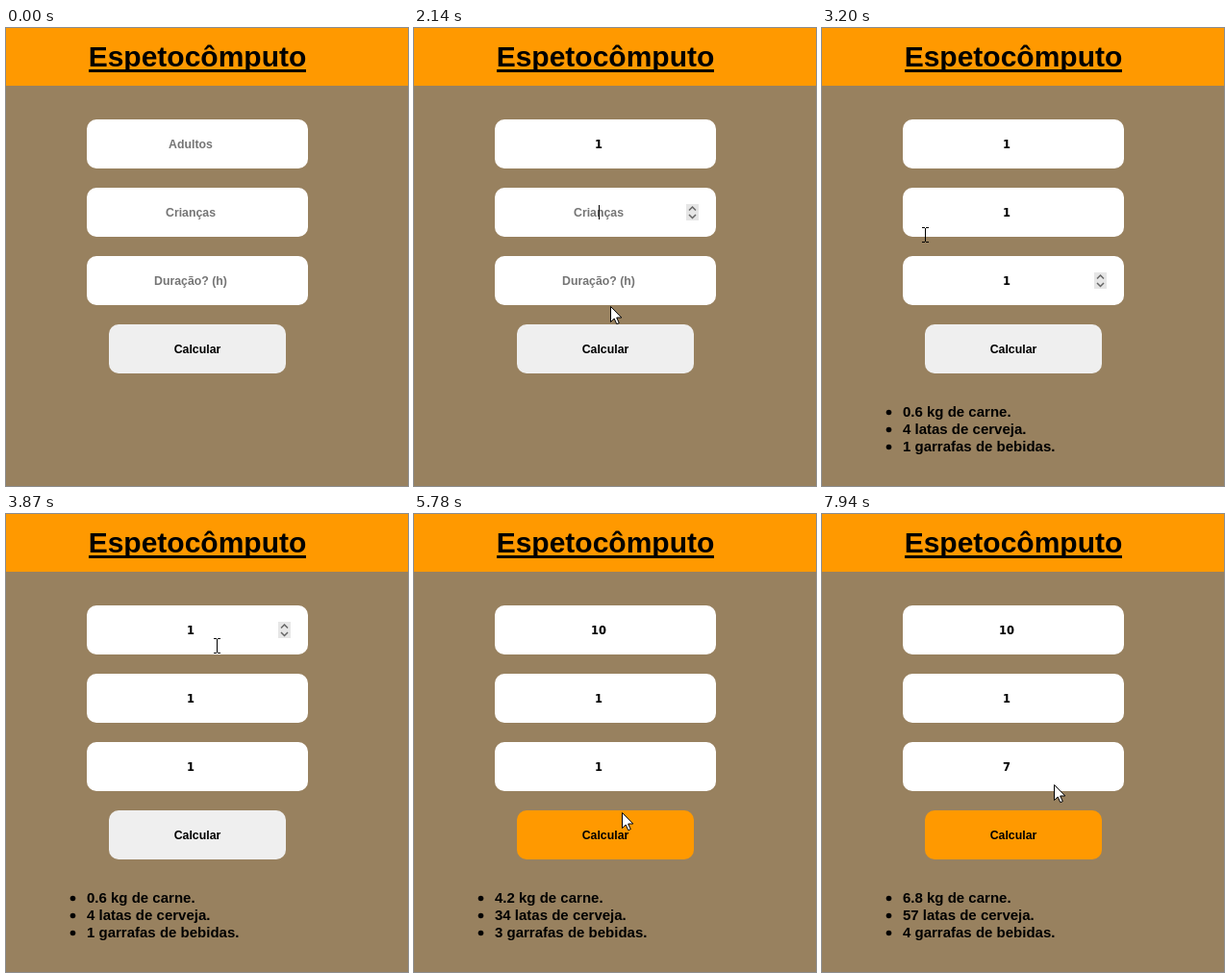
Animation, 418 px wide and 476 px high, one loop 8000 ms. Source, as an HTML page:

```html
<!DOCTYPE html>
<html lang="pt">
<head>
<meta charset="utf-8">
<title>Calculadora</title>
<style>
  html, body { margin: 0; width: 100%; height: 100%; overflow: hidden; background: #98815f; }
  svg { display: block; }
  text { font: bold 12.3px "Liberation Sans", Arial, sans-serif; text-anchor: middle; }
  .title { font-size: 30px; }
  .hint { fill: #757575; }
  .value { font: bold 11.5px "DejaVu Sans", sans-serif; }
  .item { font-size: 15px; text-anchor: start; }
</style>
</head>
<body>
<svg width="418" height="476" viewBox="0 0 418 476">
  <rect width="418" height="476" fill="#98815f"/>
  <rect width="418" height="60" fill="#ff9900"/>
  <text class="title" x="199" y="40">Espetocômputo</text>
  <rect x="86" y="43" width="226" height="3"/>
  <g id="live"></g>
</svg>
<script>
const LOOP = 8000, LAG = 70, BLINK = 510;
const live = document.getElementById('live');
const hints = ['Adultos', 'Crianças', 'Duração? (h)'];
const tops = [95, 166, 237];
const results = [null, ['0.6', 4, 1], ['4.2', 34, 3], ['6.8', 57, 4]];

// time, three field values, focused field (-1: none), result index
const states = [
  [0, '', '', '', -1, 0],
  [690, '', '', '', 0, 0],
  [830, '1', '', '', 0, 0],
  [1110, '1', '', '', 1, 0],
  [2210, '1', '1', '', 1, 0],
  [2340, '1', '1', '', 2, 0],
  [2480, '1', '1', '1', 2, 0],
  [2690, '1', '1', '1', -1, 0],
  [2760, '1', '1', '1', -1, 1],
  [4010, '1', '1', '1', 0, 1],
  [4410, '', '1', '1', 0, 1],
  [4550, '1', '1', '1', 0, 1],
  [4620, '10', '1', '1', 0, 1],
  [5640, '10', '1', '1', -1, 1],
  [5710, '10', '1', '1', -1, 2],
  [6060, '10', '1', '1', 2, 2],
  [6730, '10', '1', '', 2, 2],
  [6880, '10', '1', '7', 2, 2],
  [7600, '10', '1', '7', -1, 2],
  [7670, '10', '1', '7', -1, 3]
];

// pointer path: time, x, y
const path = [
  [0, -60, -60], [199.9, -60, -60], [200, 372, 420], [410, 310, 260], [550, 296, 100],
  [620, 240, 125], [830, 236, 128], [900, 231, 180], [970, 231, 203], [1040, 231, 203],
  [1110, 229, 198], [1400, 222, 195], [1800, 204, 285], [1870, 204, 289], [2210, 204, 289],
  [2280, 206, 272], [2450, 206, 272], [2540, 208, 312], [2690, 210, 335], [2830, 215, 340],
  [2900, 322, 400], [3010, 250, 310], [3130, 130, 245], [3200, 107, 215], [3240, 107, 215],
  [3450, 117, 188], [3700, 180, 150], [4010, 250, 127], [5150, 250, 127], [5430, 225, 312],
  [5570, 216, 318], [5780, 216, 310], [5850, 216, 310], [5920, 225, 215], [5990, 227, 250],
  [6060, 230, 272], [7390, 230, 272], [7530, 232, 315], [7740, 230, 340],
  [7939.9, 230, 340], [7940, 241, 281], [LOOP, 241, 281]
];

function pointer(t) {
  const i = Math.max(1, path.findIndex(p => p[0] > t));
  const [t0, x0, y0] = path[i - 1], [t1, x1, y1] = path[i];
  const k = Math.max(0, (t - t0) / (t1 - t0));
  return [x0 + (x1 - x0) * k, y0 + (y1 - y0) * k];
}

const inside = ([x, y], left, top, width) =>
  x >= left && x < left + width && y >= top && y < top + 51;

const box = (x, y, w, fill) =>
  `<rect x="${x}" y="${y}" width="${w}" height="51" rx="10" fill="${fill}"/>`;

const label = (cls, x, y, s) => `<text class="${cls}" x="${x}" y="${y}">${s}</text>`;

const spinner = y => `<g transform="translate(283 ${y})">
  <rect width="13" height="17" fill="#e6e6e6"/>
  <path d="M3 6.5l3.5-3.5 3.5 3.5M3 11l3.5 3.5 3.5-3.5" fill="none" stroke="#666" stroke-width="1.5"/></g>`;

const arrow = '<path d="M.5 .5v16l3.7-3.5 2.6 5.7 2.5-1.1-2.6-5.6h5.1z" fill="#fff" stroke="#000"/>';
const beam = '<path d="M-3 -7.5h3M1 -7.5h3M-3 7.5h3M1 7.5h3M.5 -7v14" fill="none" stroke="#000"/>';

function field(i, t, state, hover) {
  const y = tops[i], value = state[i + 1], focus = state[4] === i;
  let s = box(84, y, 230, '#fff');
  s += value ? label('value', 192, y + 30, value) : label('hint', 192, y + 30, hints[i]);
  if (focus || hover) s += spinner(y + 17);
  if (focus && (t - state[0]) % (2 * BLINK) < BLINK)
    s += `<rect x="${192 + 4 * value.length}" y="${y + 18}" width="1" height="15"/>`;
  return s;
}

function list([meat, beer, drinks]) {
  return [`${meat} kg de carne.`, `${beer} latas de cerveja.`, `${drinks} garrafas de bebidas.`]
    .map((s, i) => `<circle cx="69.5" cy="${399.5 + 18 * i}" r="2.8"/>` + label('item', 84, 404 + 18 * i, s))
    .join('');
}

function draw(t) {
  const state = states.filter(s => s[0] <= t).pop();
  const [x, y] = pointer(t).map(Math.round);
  // hover feedback trails the pointer slightly
  const past = pointer(Math.max(0, t - LAG));
  const over = tops.map(top => inside(past, 84, top, 230));
  const hot = inside(past, 107, 308, 184);
  let s = tops.map((_, i) => field(i, t, state, over[i])).join('');
  s += box(107, 308, 184, hot ? '#ff9900' : '#efefef') + label('', 199, 338, 'Calcular');
  if (state[5]) s += list(results[state[5]]);
  s += `<g transform="translate(${x} ${y})">${over.includes(true) ? beam : arrow}</g>`;
  live.innerHTML = s;
}

function tick() {
  draw(performance.now() % LOOP);
  requestAnimationFrame(tick);
}
tick();
</script>
</body>
</html>
```
